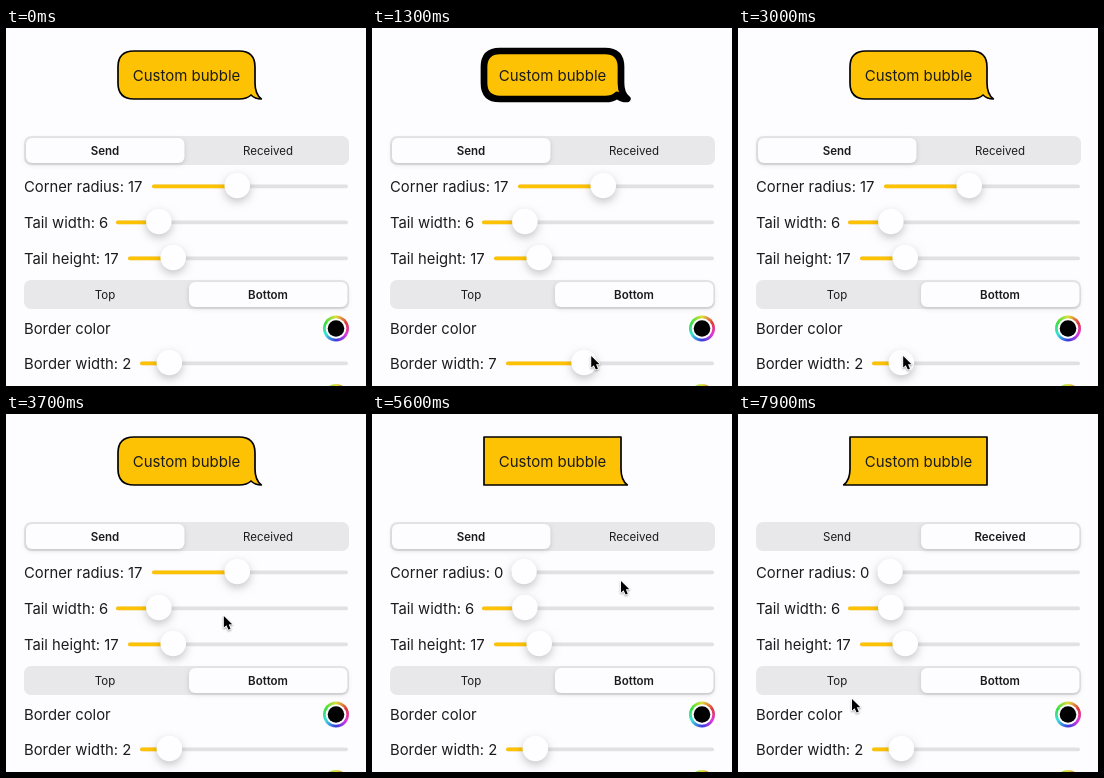
These frames come from a looping animation (360x358 px, 8 s). An HTML page with a canvas:

```html
<!DOCTYPE html>
<html lang="en">
<head>
<meta charset="utf-8">
<title>Custom bubble</title>
<style>
html, body { margin: 0; width: 100%; height: 100%; overflow: hidden; background: #fdfcff; }
canvas { display: block; width: 360px; height: 358px; }
</style>
</head>
<body>
<canvas id="stage"></canvas>
<script>
const LOOP = 8000, STEP = 100;
const WIDTH = 360, HEIGHT = 358;
const POINT = 0.94; // pixels per layout point
const YELLOW = '#fec204', INK = '#1b1b1e', PAPER = '#fdfcff';
const FONT = 'Inter, Roboto, sans-serif';

const canvas = document.getElementById('stage');
const ctx = canvas.getContext('2d');
const ratio = window.devicePixelRatio || 1;
canvas.width = WIDTH * ratio;
canvas.height = HEIGHT * ratio;

// Smooth progress from 0 to 1 between two times.
function ease(time, start, end) {
  const u = Math.min(1, Math.max(0, (time - start) / (end - start)));
  return u * u * (3 - 2 * u);
}

function glide(from, to, progress) {
  return from.map((value, i) => value + (to[i] - value) * progress);
}

function text(content, x, y, size, weight = 400, align = 'left') {
  ctx.font = `${weight} ${size}px ${FONT}`;
  ctx.textAlign = align;
  ctx.fillStyle = INK;
  ctx.fillText(content, x, y);
}

function pill(x, y, w, h, r, fill) {
  ctx.beginPath();
  ctx.roundRect(x, y, w, h, r);
  ctx.fillStyle = fill;
  ctx.fill();
}

function disc(x, y, r, fill) {
  ctx.beginPath();
  ctx.arc(x, y, r, 0, Math.PI * 2);
  ctx.fillStyle = fill;
  ctx.fill();
}

function withShadow(color, blur, offset, draw) {
  ctx.save();
  ctx.shadowColor = color;
  ctx.shadowBlur = blur * ratio;
  ctx.shadowOffsetY = offset * ratio;
  draw();
  ctx.restore();
}

// Corners are quadratic curves; the tail joins the middle of the bottom one.
function drawBubble(radius, border, received) {
  const left = 112, right = 249, top = 23, bottom = 71;
  const r = radius * POINT, tip = right + 6.3, tailTop = bottom - 17 * POINT;
  ctx.save();
  if (received) {
    ctx.translate(left + right, 0);
    ctx.scale(-1, 1);
  }
  ctx.beginPath();
  ctx.moveTo(left + r, top);
  ctx.lineTo(right - r, top);
  ctx.quadraticCurveTo(right, top, right, top + r);
  ctx.lineTo(right, tailTop);
  ctx.quadraticCurveTo(right, bottom - 5, tip, bottom);
  ctx.quadraticCurveTo(right, bottom, right - r / 4, bottom - r / 4);
  ctx.quadraticCurveTo(right - r / 2, bottom, right - r, bottom);
  ctx.lineTo(left + r, bottom);
  ctx.quadraticCurveTo(left, bottom, left, bottom - r);
  ctx.lineTo(left, top + r);
  ctx.quadraticCurveTo(left, top, left + r, top);
  ctx.closePath();
  ctx.fillStyle = YELLOW;
  ctx.fill();
  ctx.lineWidth = border * POINT;
  ctx.lineJoin = 'round';
  ctx.strokeStyle = '#000';
  ctx.stroke();
  ctx.restore();
  text('Custom bubble', 180.5, 52.5, 15, 400, 'center');
}

function drawSegments(y, labels, position) {
  pill(18, y, 325, 29, 7, '#e8e7ea');
  withShadow('rgba(0,0,0,.16)', 4, 1.5, () =>
    pill(20 + 163 * position, y + 2, 158.5, 25, 6, PAPER));
  labels.forEach((label, i) => {
    const weight = Math.round(position) === i ? 600 : 400;
    text(label, 99 + 163 * i, y + 18.8, 11.5, weight, 'center');
  });
}

// The track begins after the label, so it moves with the digits' width.
// Returns the knob's centre.
function drawSlider(y, label, value, max, labelEnd) {
  const digits = String(Math.round(value));
  text(`${label}: ${digits}`, 18, y + 5.5, 14.8);
  const start = [...digits].reduce((x, d) => x + (d === '1' ? 7 : 9), labelEnd);
  const knob = start + 13 + value / max * (342 - start - 26);
  pill(start, y - 1.4, 342 - start, 3.6, 1.8, '#e1e0e3');
  pill(start, y - 1.4, knob - start, 3.6, 1.8, YELLOW);
  withShadow('rgba(0,0,0,.22)', 9, 3.5, () => disc(knob, y - 0.5, 12.8, '#fefdff'));
  return knob;
}

function drawColorWell(x, y) {
  const hues = ctx.createConicGradient(-Math.PI / 2, x, y);
  for (let i = 0; i <= 12; i++) hues.addColorStop(i / 12, `hsl(${60 - 30 * i} 72% 55%)`);
  disc(x, y, 13, hues);
  disc(x, y, 10.3, PAPER);
  disc(x, y, 8.3, '#000');
}

function drawCursor(x, y) {
  ctx.save();
  ctx.translate(x, y);
  ctx.scale(0.82, 0.82);
  ctx.beginPath();
  [[0, 0], [0, 14], [3.2, 11.2], [5.6, 16.6], [8.2, 15.5], [5.9, 10.2], [10.2, 10]]
    .forEach(([px, py]) => ctx.lineTo(px, py));
  ctx.closePath();
  ctx.lineWidth = 2;
  ctx.lineJoin = 'round';
  ctx.strokeStyle = '#fff';
  withShadow('rgba(0,0,0,.35)', 2, 1, () => ctx.stroke());
  ctx.fillStyle = '#000';
  ctx.fill();
  ctx.restore();
}

function render(time) {
  const during = (start, end) => ease(time, start, end);
  const border = 1.8 + 5.35 * during(500, 1300) - 5.66 * during(1300, 2100)
    + 0.31 * during(2200, 2700);
  const radius = 17 * (1 - during(4000, 4900));
  const received = during(6100, 6400);

  ctx.setTransform(ratio, 0, 0, ratio, 0, 0);
  ctx.fillStyle = PAPER;
  ctx.fillRect(0, 0, WIDTH, HEIGHT);

  drawBubble(radius, border, received > 0);
  drawSegments(108, ['Send', 'Received'], received);
  const radiusKnob = drawSlider(158, 'Corner radius', radius, 40, 130);
  drawSlider(194, 'Tail width', 5.8, 40, 101);
  drawSlider(230, 'Tail height', 16.6, 100, 106);
  drawSegments(252, ['Top', 'Bottom'], 1);
  text('Border color', 18, 306, 14.8);
  drawColorWell(330, 300.5);
  const borderKnob = drawSlider(335, 'Border width', border, 20, 125);
  drawColorWell(330, 369);

  // The cursor drags the two knobs, then visits the segments.
  let cursor = [borderKnob + border, 364 - 36 * during(300, 500)];
  cursor = glide(cursor, [radiusKnob + 5, 158], during(3100, 4000));
  cursor = glide(cursor, [249, 167], during(5000, 5600));
  cursor = glide(cursor, [282, 129], during(5600, 6000));
  cursor = glide(cursor, [114, 285], during(6700, 7500));
  drawCursor(...cursor);
}

const origin = performance.now();
function frame() {
  const time = (performance.now() - origin) % LOOP;
  render(Math.floor(time / STEP) * STEP);
  requestAnimationFrame(frame);
}
frame();
</script>
</body>
</html>
```
